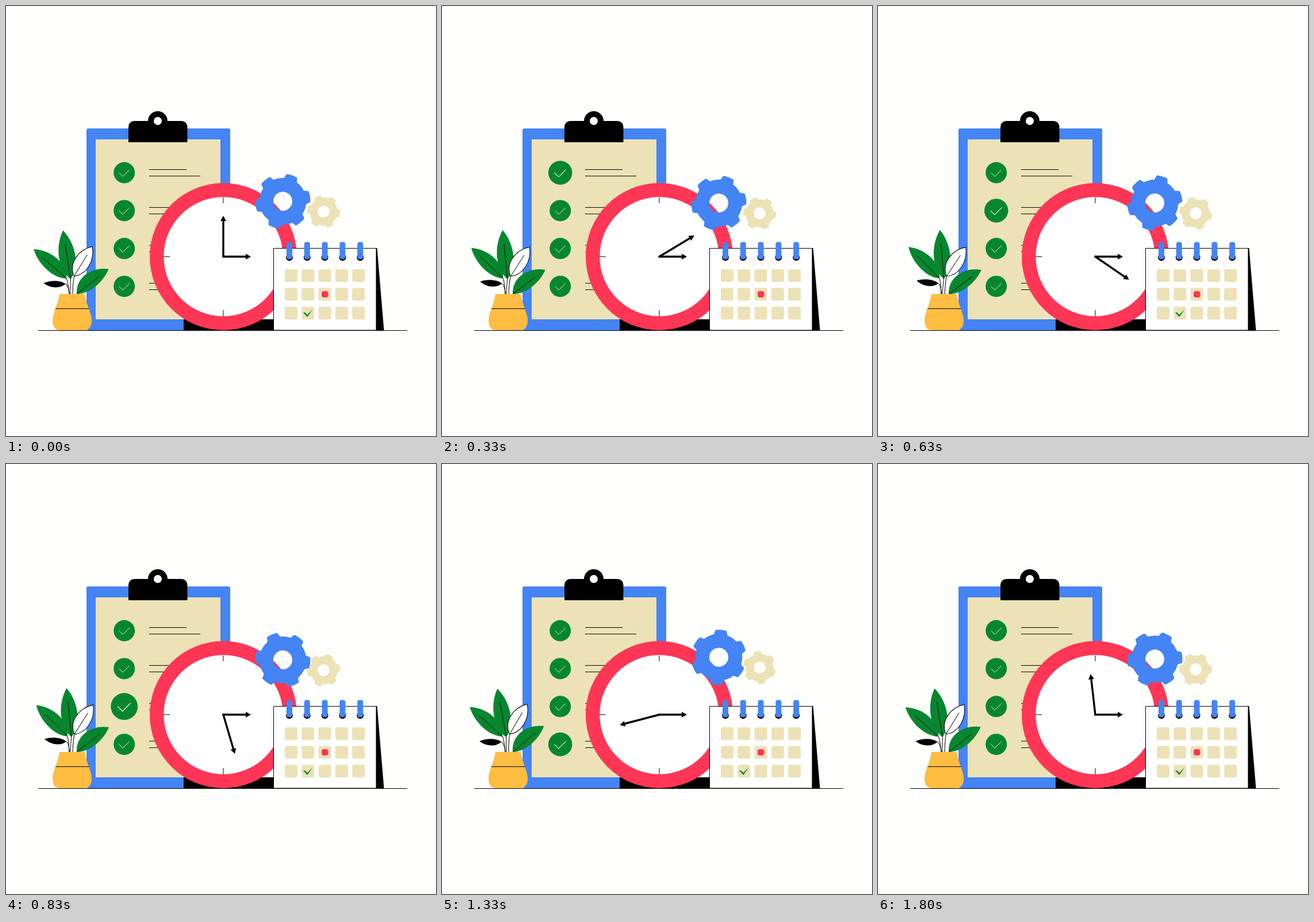
Recreate the animation shown at these times as an HTML page with a canvas. Size 748 px wide and 748 px high, loop 1.83 s.

```html
<!DOCTYPE html>
<html lang="en">
<head>
<meta charset="utf-8">
<title>Time management</title>
<style>
  html, body { margin: 0; width: 100%; height: 100%; overflow: hidden; background: #fefefd; }
  canvas { display: block; width: 748px; height: 748px; }
</style>
</head>
<body>
<canvas id="stage" width="748" height="748"></canvas>
<script>
const ctx = document.getElementById('stage').getContext('2d');
const LOOP = 1830, STEPS = 55, TAU = Math.PI * 2, DEG = Math.PI / 180;
const C = {
  paper: '#fefefd', blue: '#4484f5', cream: '#ece2b6', green: '#06872f',
  red: '#ff3655', yellow: '#ffbd41', black: '#000', white: '#fff'
};

function fill(color) { ctx.fillStyle = color; ctx.fill(); }
function stroke(color, width) { ctx.strokeStyle = color; ctx.lineWidth = width; ctx.stroke(); }

function box(x, y, w, h, r, color) {
  ctx.beginPath();
  ctx.roundRect(x, y, w, h, r);
  fill(color);
}

function disc(x, y, r, color) {
  ctx.beginPath();
  ctx.arc(x, y, r, 0, TAU);
  fill(color);
}

function path(points, close) {
  ctx.beginPath();
  for (const [x, y] of points) ctx.lineTo(x, y);
  if (close) ctx.closePath();
}

function line(x1, y1, x2, y2, width = 1, color = C.black) {
  path([[x1, y1], [x2, y2]]);
  stroke(color, width);
}

// Draws around a point, turned and scaled
function at(x, y, angle, scale, draw) {
  ctx.save();
  ctx.translate(x, y);
  ctx.rotate(angle);
  ctx.scale(scale, scale);
  draw();
  ctx.restore();
}

function clipboard(k) {
  box(140, 213, 250, 351, 3, C.blue);
  box(156, 232, 217, 313, 0, C.cream);
  box(213, 200, 102.5, 37, [10, 10, 0, 0], C.black);
  disc(264, 200, 17, C.black);
  disc(264, 200, 7, C.white);
  for (let i = 0; i < 4; i++) {
    const y = 290 + 65.9 * i;
    line(249, y - 5.5, 314, y - 5.5);
    line(249, y + 5.8, 338, y + 5.8);
    const p = (k - 10 * i) / 11;
    const grow = p > 0 && p < 1 ? 5 * Math.sin(Math.PI * p) ** 1.3 : 0;
    at(205.7, y, 0, 1 + grow / 18.5, () => {
      disc(0, 0, 18.5, C.green);
      path([[-9, 0], [-2.5, 6.5], [9, -5]]);
      stroke('#e4edcc', 1);
    });
  }
}

function hand(angle, length, width) {
  at(378, 436, angle, 1, () => {
    line(0, 0, 0, 8 - length, width);
    path([[0, -length], [5, 9 - length], [-5, 9 - length]], true);
    fill(C.black);
  });
}

function clock(turn) {
  box(309, 545, 157, 19, 0, C.black);
  disc(378, 436, 128, C.red);
  disc(378, 436, 103.7, C.white);
  line(378, 333, 378, 343);
  line(378, 529, 378, 540);
  line(274, 436, 285, 436);
  hand(Math.PI / 2, 48, 3.4);
  hand(turn, 71, 3.4);
  disc(378, 436, 1.9, C.black);
}

// Six-toothed wheel with an open hub
function gear(x, y, angle, r, hub, color) {
  at(x, y, angle, 1, () => {
    ctx.beginPath();
    for (let i = 0; i < 6; i++) {
      const mid = i * TAU / 6 - Math.PI / 2;
      ctx.arc(0, 0, r, mid - 11.5 * DEG, mid + 11.5 * DEG);
      ctx.arc(0, 0, r * 0.85, mid + 17 * DEG, mid + 43 * DEG);
    }
    ctx.closePath();
    ctx.moveTo(hub, 0);
    ctx.arc(0, 0, hub, 0, TAU, true);
    fill(color);
  });
}

function calendar(k) {
  path([[644, 421], [645.5, 421], [657.5, 564], [644, 564]], true);
  fill(C.black);
  ctx.beginPath();
  ctx.rect(465.5, 421.5, 178.5, 142.5);
  fill(C.white);
  stroke(C.black, 1);
  for (let i = 0; i < 5; i++) {
    const x = 493 + 30.8 * i;
    disc(x, 437.3, 6, C.black);
    box(x - 5, 410.5, 10, 30, 4, C.blue);
    for (let j = 0; j < 3; j++) {
      box(485 + 29.3 * i, 458 + 32.6 * j, 22, 22, 3, C.cream);
    }
  }
  box(549, 496, 11.5, 11, 4, C.red);
  const size = k < 18 ? (1 + Math.cos(k / 9 * Math.PI)) / 2 : 1;
  at(525, 534.5, 0, size, () => {
    path([[-8, -1], [-5, -1.5], [-1, 2.5], [8.5, -6.5], [-0.8, 6.5]], true);
    fill(C.green);
  });
}

// A leaf from base to tip, bulging by a on its left and b on its right
function leaf(bx, by, tx, ty, a, b, color) {
  const len = Math.hypot(tx - bx, ty - by);
  at(bx, by, Math.atan2(ty - by, tx - bx), 1, () => {
    ctx.beginPath();
    ctx.moveTo(0, 0);
    ctx.bezierCurveTo(len * 0.22, -a, len * 0.68, -a, len, 0);
    ctx.bezierCurveTo(len * 0.68, b, len * 0.22, b, 0, 0);
    ctx.closePath();
    fill(color);
    if (color === C.white) stroke(C.black, 1);
    if (color !== C.black) line(0, 0, len * 0.72, 0, 0.9);
  });
}

function stem(x1, y1, cx, cy, x2, y2) {
  ctx.beginPath();
  ctx.moveTo(x1, y1);
  ctx.quadraticCurveTo(cx, cy, x2, y2);
  stroke(C.black, 1);
}

function plant(k) {
  const sway = (x, amount, peak, draw) => at(x, 501, amount * Math.cos((k - peak) / STEPS * TAU), 1, () => {
    ctx.translate(-x, -501);
    draw();
  });
  sway(112, 0.058, 19, () => {
    leaf(104, 483, 66, 480.5, 9, 6, C.black);
    stem(104, 483, 109, 486, 111, 505);
  });
  sway(112, 0.038, 20, () => {
    leaf(106, 474, 50, 421.5, 15, 20, C.green);
    stem(106, 474, 109, 482, 110, 505);
  });
  sway(113, 0.058, 17, () => {
    leaf(113, 475, 101.5, 390, 19, 19, C.green);
    stem(113, 475, 112, 486, 112, 505);
  });
  sway(115, 0.03, 15, () => {
    leaf(118.5, 470, 150.5, 418.5, 19, 17, C.white);
    stem(118.5, 470, 116, 485, 116, 505);
  });
  sway(124, 0.03, 14, () => {
    leaf(123, 501, 178.6, 457.5, 23, 13, C.green);
  });
  ctx.beginPath();
  ctx.moveTo(93, 501);
  ctx.lineTo(137, 501);
  ctx.bezierCurveTo(140, 521, 149, 534, 149, 547);
  ctx.bezierCurveTo(149, 557, 145, 564, 136, 564);
  ctx.lineTo(94, 564);
  ctx.bezierCurveTo(85, 564, 81, 557, 81, 547);
  ctx.bezierCurveTo(81, 534, 90, 521, 93, 501);
  fill(C.yellow);
  line(86, 526.5, 144, 526.5);
}

function render(ms) {
  const tick = Math.floor(ms / 10) * 10 + 5;
  let k = Math.min(STEPS - 1, Math.floor(tick * 0.03));
  if (k % 30 === 10) k--; // short stutter once a second
  const turn = k / STEPS * TAU;
  const bob = 3.6 * Math.sin(turn);

  ctx.fillStyle = C.paper;
  ctx.fillRect(0, 0, 748, 748);
  clipboard(k);
  clock(turn);
  gear(481.5, 339.7 + bob, 20 * DEG - turn, 48, 16.5, C.blue);
  gear(552.5, 357.7 + bob, 37 * DEG + turn, 28.7, 10.3, C.cream);
  calendar(k);
  plant(k);
  line(56, 564.5, 698, 564.5);
}

const start = performance.now();
function loop() {
  render((performance.now() - start) % LOOP);
  requestAnimationFrame(loop);
}
loop();
</script>
</body>
</html>
```
